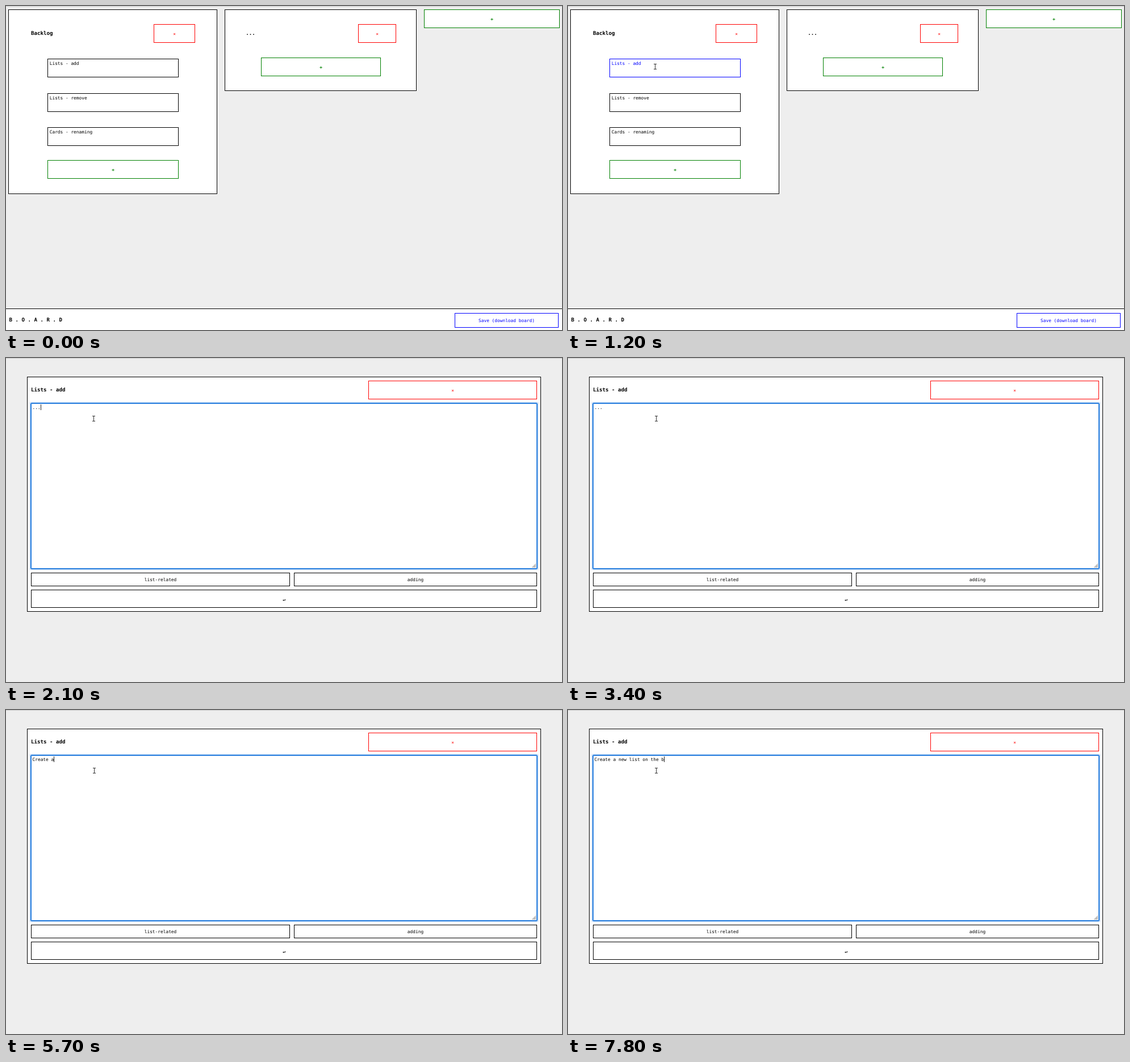
An HTML page with a canvas for the animation above (8000 ms loop, 979 by 572 pixels).

```html
<!DOCTYPE html>
<html lang="en">
<head>
<meta charset="utf-8">
<title>Board</title>
<style>
  html, body { margin: 0; width: 100%; height: 100%; overflow: hidden; background: #eee; }
  canvas { display: block; }
</style>
</head>
<body>
<canvas id="stage" width="979" height="572"></canvas>
<script>
const ctx = document.getElementById('stage').getContext('2d', { alpha: false });
const LOOP = 8000;
const FONT = '"DejaVu Sans Mono", monospace';
const SMALL = `7.83px ${FONT}`;
const BOLD = `bold 7.83px ${FONT}`;
const HEAD = `bold 9.16px ${FONT}`;
const CHAR = 4.71;
const NOTE = 'Create a new list on the b';

// [time, characters typed]
const TYPED = [[4900, 1], [5300, 3], [5400, 5], [5600, 6], [5700, 8], [5900, 10],
  [6000, 12], [6200, 14], [6400, 16], [6600, 17], [7300, 19], [7400, 21],
  [7500, 22], [7600, 24], [7800, 26]];

// [time, x, y] of the pointer
const POINTER = [[200, 192, 24], [300, 184, 46], [400, 175, 70], [500, 166, 97],
  [600, 160, 107], [700, 157, 110], [1200, 153, 107], [2100, 154, 107],
  [2300, 154, 109], [2400, 155, 107]];

function latest(steps, t) {
  let hit = null;
  for (const s of steps) if (t >= s[0]) hit = s;
  return hit;
}

// Outlined box; corners are the outermost pixels of its border
function box(x0, y0, x1, y1, color = '#000') {
  ctx.fillStyle = '#fff';
  ctx.fillRect(x0, y0, x1 - x0 + 1, y1 - y0 + 1);
  ctx.strokeStyle = color;
  ctx.lineWidth = 1;
  ctx.strokeRect(x0 + 0.5, y0 + 0.5, x1 - x0, y1 - y0);
}

function text(str, x, y, color = '#000', font = SMALL, align = 'left') {
  ctx.font = font;
  ctx.textAlign = align;
  ctx.fillStyle = color;
  ctx.fillText(str, x, y);
}

function button(x0, y0, x1, y1, label, color, font, base) {
  box(x0, y0, x1, y1, color);
  text(label, (x0 + x1 + 1) / 2, base, color, font, 'center');
}

const addButton = (x0, y0, x1, y1) => button(x0, y0, x1, y1, '+', '#008000', BOLD, y0 + 19.7);
const closeButton = (x0, y0, x1, y1) => button(x0, y0, x1, y1, '×', '#f00', SMALL, y0 + 19.6);

function card(y, label, color) {
  box(73, y, 303, y + 32, color);
  text(label, 76.7, y + 11.4, color);
}

function drawBoard(hover) {
  box(4, 6, 371, 331);
  text('Backlog', 43.9, 51, '#000', HEAD);
  closeButton(260, 32, 332, 64);
  card(154, 'Lists - remove', '#000');
  card(214, 'Cards - renaming', '#000');
  card(93, 'Lists - add', hover ? '#00f' : '#000');
  addButton(73, 272, 303, 304);

  box(385, 6, 722, 149);
  text('...', 422.2, 51, '#000', HEAD);
  closeButton(620, 32, 686, 64);
  addButton(449, 91, 659, 123);

  addButton(736, 6, 974, 38);

  ctx.fillStyle = '#fff';
  ctx.fillRect(0, 535, 979, 37);
  ctx.fillStyle = '#000';
  ctx.fillRect(0, 534, 979, 1);
  text('B . O . A . R . D', 5.4, 556.6, '#000', HEAD);
  button(790, 542, 972, 567, 'Save (download board)', '#00f', SMALL, 557.6);
}

function drawGrip() {
  ctx.fillStyle = '#c8c8c8';
  ctx.beginPath();
  ctx.moveTo(933, 363);
  ctx.lineTo(933, 370);
  ctx.lineTo(926, 370);
  ctx.fill();
  ctx.strokeStyle = '#999';
  ctx.lineWidth = 0.6;
  ctx.beginPath();
  for (const d of [0, 3]) {
    ctx.moveTo(926 + d, 370);
    ctx.lineTo(933, 363 + d);
  }
  ctx.stroke();
}

function drawFocus() {
  const ring = (inset, color, width) => {
    ctx.strokeStyle = color;
    ctx.lineWidth = width;
    ctx.beginPath();
    ctx.roundRect(44 - inset, 80 - inset, 891 + 2 * inset, 292 + 2 * inset, 1.5);
    ctx.stroke();
  };
  ring(2.5, 'rgba(42,127,222,.08)', 1);
  ring(1.5, 'rgba(42,127,222,.28)', 1);
  ring(0, '#2a7fde', 2);
}

function drawNote(t) {
  const typed = latest(TYPED, t);
  const selected = t >= 3900 && !typed;
  if (selected) {
    ctx.fillStyle = '#3584e4';
    ctx.fillRect(47, 82, 14, 10);
  }
  const str = typed ? NOTE.slice(0, typed[1]) : '...';
  text(str, 46.5, 90.4, selected ? '#fff' : '#000');

  const caret = (t >= 2100 && t < 3400) || (t >= 4900 && t < 6900) || t >= 7300;
  if (caret) {
    ctx.fillStyle = '#222';
    ctx.fillRect(Math.round(46.45 + CHAR * str.length), 82, 1, 10);
  }
}

function drawDialog(t) {
  box(37, 33, 941, 447);
  text('Lists - add', 43.9, 58.6, '#000', HEAD);
  closeButton(638, 40, 934, 72);
  box(44, 80, 934, 371, '#85858c');
  if (t >= 2100) drawFocus();
  drawGrip();
  drawNote(t);
  button(44, 379, 499, 402, 'list-related', '#000', SMALL, 394);
  button(507, 379, 934, 402, 'adding', '#000', SMALL, 394);
  button(44, 409, 934, 440, '↵', '#000', BOLD, 428.6);
}

function drawBeam(x, y) {
  const path = () => {
    ctx.beginPath();
    ctx.moveTo(x - 2, y - 4.5);
    ctx.lineTo(x + 3, y - 4.5);
    ctx.moveTo(x + 0.5, y - 4.5);
    ctx.lineTo(x + 0.5, y + 4.5);
    ctx.moveTo(x - 2, y + 4.5);
    ctx.lineTo(x + 3, y + 4.5);
  };
  path();
  ctx.strokeStyle = '#333';
  ctx.lineWidth = 1;
  ctx.stroke();
}

function drawArrow(x, y) {
  ctx.beginPath();
  ctx.moveTo(x, y);
  for (const [dx, dy] of [[0, 10], [2.4, 7.9], [4, 11.4], [5.4, 10.7], [3.9, 7.3], [7, 7]])
    ctx.lineTo(x + dx, y + dy);
  ctx.closePath();
  ctx.fillStyle = '#000';
  ctx.fill();
  ctx.strokeStyle = '#fff';
  ctx.lineWidth = 0.6;
  ctx.stroke();
}

function draw(t) {
  ctx.textRendering = 'geometricPrecision';
  ctx.fillStyle = '#eee';
  ctx.fillRect(0, 0, 979, 572);
  ctx.fillStyle = '#ccc';
  ctx.fillRect(0, 0, 979, 1);

  const pointer = latest(POINTER, t);
  const overCard = !!pointer && pointer[2] > 94;
  if (t < 1400) drawBoard(overCard);
  else drawDialog(t);
  if (pointer) (overCard ? drawBeam : drawArrow)(pointer[1], pointer[2]);
}

const start = performance.now();
function tick() {
  draw((performance.now() - start) % LOOP);
  requestAnimationFrame(tick);
}
tick();
</script>
</body>
</html>
```
